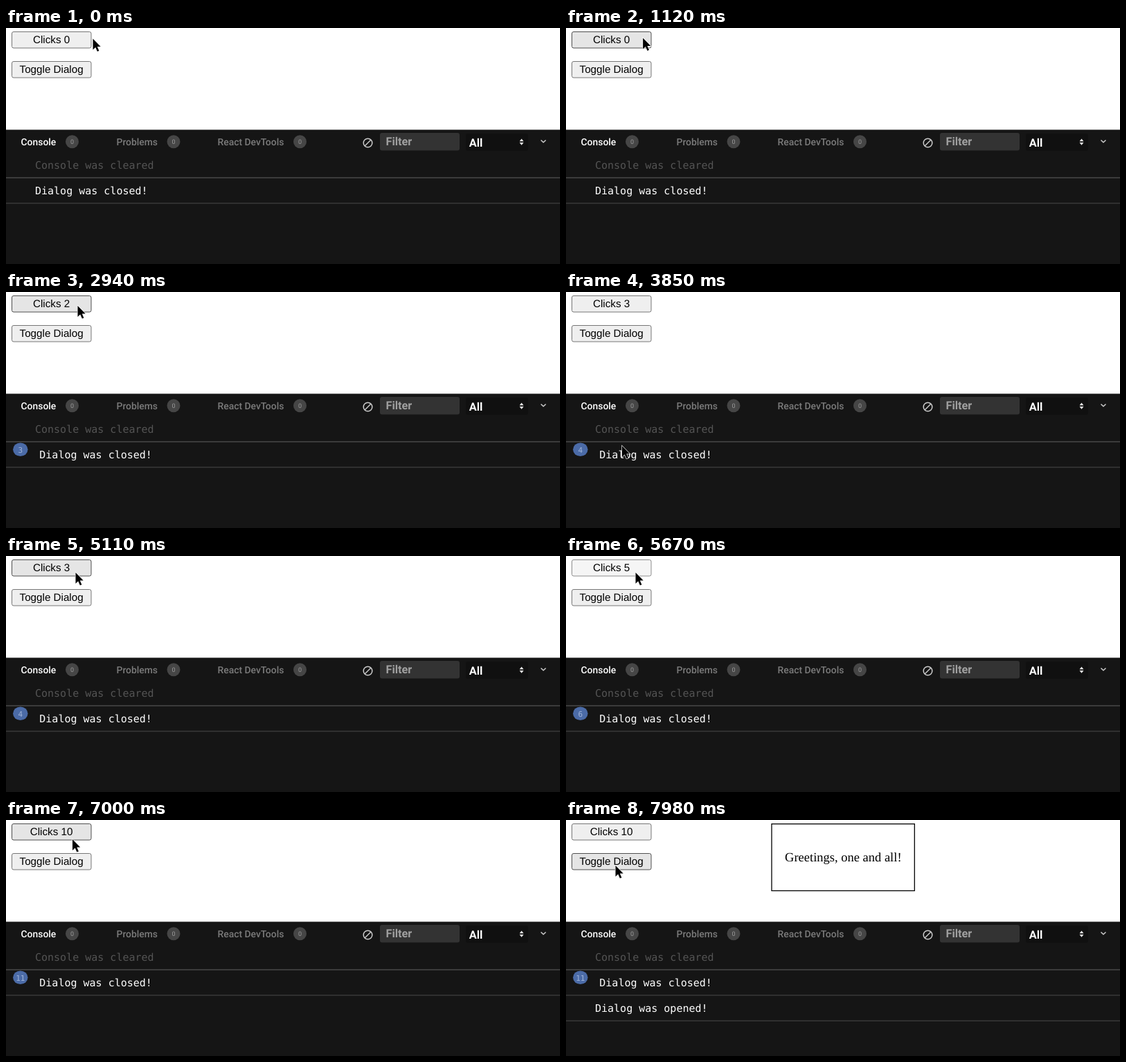
An HTML page that plays this animation: 800x342 px, repeating every 8000 ms.

```html
<!DOCTYPE html>
<html lang="en">
<head>
<meta charset="utf-8">
<title>Dialog toggle and console</title>
<style>
  html, body { margin: 0; width: 100%; height: 100%; overflow: hidden; background: #fff; }
  svg { display: block; width: 800px; height: 342px; text-rendering: geometricPrecision; }
  .button { font: 15.2px "Liberation Sans", Arial, sans-serif; text-anchor: middle; }
  .tab { font: 500 13.9px Roboto, sans-serif; fill: #7b7b7b; }
  .field { font: 600 16.3px Roboto, sans-serif; }
  .count { font: 9px Roboto, sans-serif; fill: #9a9a9a; text-anchor: middle; }
  .log { font: 15px "DejaVu Sans Mono", monospace; fill: #fff; }
  .badge { font: 11px "DejaVu Sans Mono", monospace; fill: #9fb3d8; text-anchor: middle; }
  .dialog { font: 18.5px "Liberation Serif", Times, serif; text-anchor: middle; }
</style>
</head>
<body>
<svg viewBox="0 0 800 342">
  <g class="button">
    <rect id="clickBox" x="8.5" y="5.5" width="114.5" height="23.5" rx="2.5"/>
    <text id="clickLabel" x="65.6" y="22"></text>
    <rect id="toggleBox" x="8.5" y="48.5" width="114.5" height="23.5" rx="2.5"/>
    <text x="65.6" y="65.3">Toggle Dialog</text>
  </g>

  <g id="dialog">
    <rect x="297" y="5.7" width="206.3" height="96.8" fill="#fff" stroke="#000" stroke-width="1.3"/>
    <text class="dialog" x="400.3" y="60">Greetings, one and all!</text>
  </g>

  <rect y="147" width="800" height="2" fill="#777"/>
  <rect y="148" width="800" height="194" fill="#151515"/>

  <text class="tab" x="21.5" y="169.5" style="fill:#fff">Console</text>
  <text class="tab" x="159.5" y="169.5">Problems</text>
  <text class="tab" x="305.5" y="169.5">React DevTools</text>
  <g fill="#464646">
    <circle cx="95.5" cy="164.7" r="9.5"/>
    <circle cx="242" cy="164.7" r="9.5"/>
    <circle cx="424.5" cy="164.7" r="9.5"/>
  </g>
  <g class="count">
    <text x="95.5" y="168">0</text>
    <text x="242" y="168">0</text>
    <text x="424.5" y="168">0</text>
  </g>

  <g fill="none" stroke="#ccc" stroke-width="1.5">
    <circle cx="522.5" cy="166.5" r="6.3"/>
    <path d="M518 171l9-9"/>
    <path d="M772.5 162.5l3.5 3.3 3.5-3.3"/>
  </g>
  <rect x="540" y="152" width="115" height="25.5" rx="3" fill="#333"/>
  <text class="field" x="548.5" y="170.3" fill="#a0a0a0">Filter</text>
  <rect x="664" y="153" width="90" height="25" rx="3" fill="#101010"/>
  <text class="field" x="668.7" y="172" fill="#fff">All</text>
  <path d="M741.5 164.2l3-3.7 3 3.7zM741.5 166l3 3.7 3-3.7z" fill="#eee"/>

  <text class="log" x="42" y="204" font-style="italic" style="fill:#545454">Console was cleared</text>
  <path d="M0 217h800" stroke="#626262"/>
  <text class="log" id="closed" y="241">Dialog was closed!</text>
  <path d="M0 254h800" stroke="#4a4a4a"/>
  <g id="badge">
    <ellipse cx="20.8" cy="228.3" rx="10.7" ry="9.8" fill="#4b6ba7"/>
    <text class="badge" id="badgeCount" x="20.8" y="232.5"></text>
  </g>
  <g id="opened">
    <text class="log" x="42" y="278">Dialog was opened!</text>
    <path d="M0 291h800" stroke="#4a4a4a"/>
  </g>

  <path id="cursor" d="M0 0V16L3.7 12.5 6.4 18.5 8.9 17.4 6.3 11.6H11.2Z"
        fill="#000" stroke="#fff" stroke-width="1.3" paint-order="stroke"/>
</svg>
<script>
const LOOP = 8000, STEP = 70, OPEN_AT = 7980, TOGGLE_PRESS = 7910;

// Mouse presses on the counter: [down, up]
const presses = [
  [2100, 2240], [2660, 2800], [3150, 3290],
  [5250, 5320], [5460, 5530], [5670, 5810], [5950, 6020],
  [6160, 6230], [6370, 6440], [6580, 6720]
];

// Cursor stops: [time, x, y]
const stops = [
  [0, 125.5, 15.5], [210, 113, 13], [980, 113, 13], [1470, 103.5, 20],
  [3500, 103.5, 20], [3850, 81, 223], [4060, 42, 228], [4340, 36, 230],
  [4620, 44, 226], [5110, 100.5, 24], [6860, 100.5, 24], [7000, 96, 28],
  [7420, 72, 65], [7630, 72, 65], [7700, 71.5, 66], [LOOP, 71.5, 66]
];

const el = id => document.getElementById(id);
const show = (id, on) => el(id).setAttribute("visibility", on ? "visible" : "hidden");

function cursorAt(t) {
  const i = stops.findIndex(s => s[0] > t);
  const [t0, x0, y0] = stops[i - 1], [t1, x1, y1] = stops[i];
  const p = (t - t0) / (t1 - t0), e = p * p * (3 - 2 * p);
  return [x0 + (x1 - x0) * e, y0 + (y1 - y0) * e];
}

function paintButton(id, top, [x, y], pressed) {
  const hover = x >= 8 && x <= 123 && y >= top && y <= top + 24;
  const [fill, stroke] = pressed ? ["#f5f5f5", "#8d8d8d"]
    : hover ? ["#e5e5e5", "#4f4f4f"] : ["#efefef", "#767676"];
  el(id).setAttribute("fill", fill);
  el(id).setAttribute("stroke", stroke);
}

function draw(now) {
  const t = Math.floor((now % LOOP) / STEP) * STEP;
  const cursor = cursorAt(t);
  const clicks = presses.filter(p => t >= p[1]).length;
  const open = t >= OPEN_AT;

  paintButton("clickBox", 5, cursor, presses.some(([down, up]) => t >= down && t < up));
  paintButton("toggleBox", 48, cursor, t >= TOGGLE_PRESS && !open);
  el("clickLabel").textContent = "Clicks " + clicks;
  el("badgeCount").textContent = clicks + 1;
  el("closed").setAttribute("x", clicks ? 48.3 : 42);
  show("badge", clicks > 0);
  show("dialog", open);
  show("opened", open);
  el("cursor").setAttribute("transform", `translate(${cursor})`);
  requestAnimationFrame(draw);
}

const start = performance.now();
draw(0);
function tick() { return performance.now() - start; }
</script>
</body>
</html>
```
